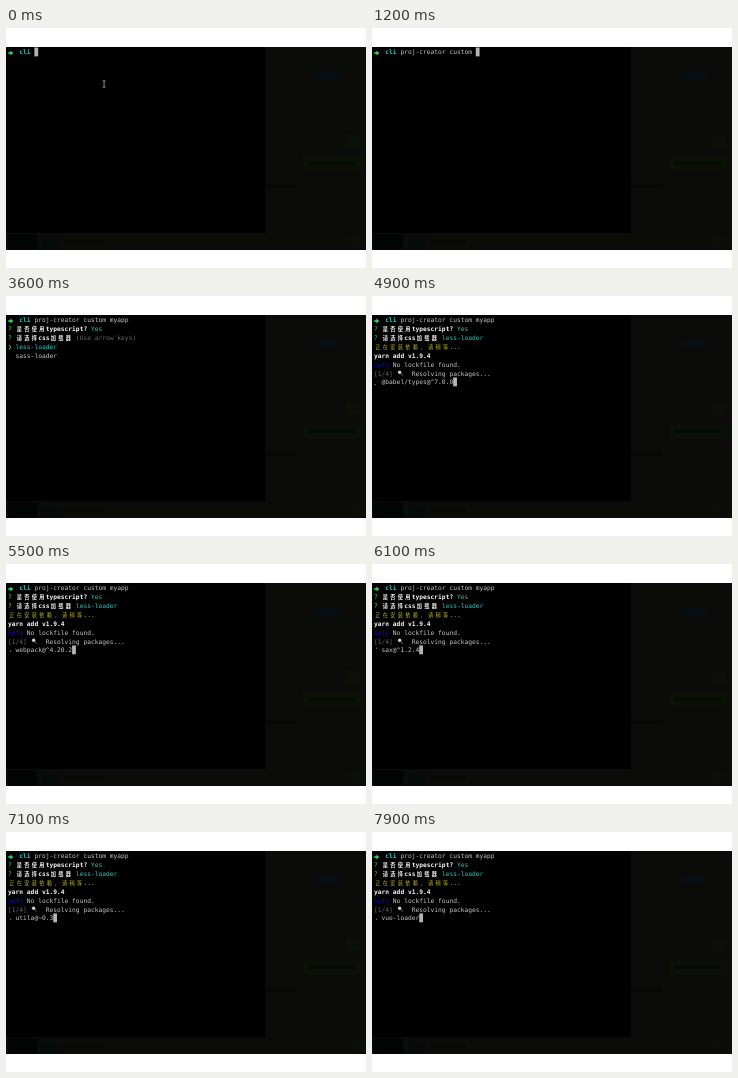
These frames come from a looping animation (360 by 240 pixels, 8000 ms). An HTML page with a canvas:

```html
<!DOCTYPE html>
<html lang="zh">
<head>
<meta charset="utf-8">
<title>Terminal</title>
<style>
  html, body { margin: 0; width: 100%; height: 100%; overflow: hidden; background: #fff; }
  canvas { display: block; width: 360px; height: 240px; }
</style>
</head>
<body>
<canvas id="stage"></canvas>
<script>
const LOOP = 8000;
const CELL = 3.77, ROW = 8.85, LEFT = 2, TOP = 19.5, SIZE = 6.25, WIDE_SIZE = 5.2;
const FONT = '"DejaVu Sans Mono", "Noto Sans CJK SC", "Noto Sans CJK", "DejaVu Sans", monospace';
const GREEN = '#2fe05a', CYAN = '#28c8ca', WHITE = '#f4f4f4', GREY = '#c4c4c4',
      DIM = '#686868', YELLOW = '#b9b524', BLUE = '#1212a4';

const PACKAGES = `@babel/core@^7.1.2 @babel/parser@^7.1.2 @babel/template@^7.1.2
@babel/types@^7.0.0 semver@^5.4.1 css-loader@^1.0.0 postcss-normalize-unicode@^4.0.1
loader-utils@^1.1.0 less-loader@^4.1.0 webpack@^4.20.2 acorn@^5.6.2 ajv@^6.1.0
micromatch@^3.1.8 tapable@^1.1.0 svgo@^1.0.0
sax@^1.2.4 mkdirp@~0.5.1 csso@^3.5.0 coa@~2.0.1 stable@~0.1.6 css-tree@1.0.0 mdn-data@~1.1.0
html-minifier@^3.2.3 pretty-error@^2.0.2 renderkid@^2.0.1
utila@~0.3 dom-converter@~0.2 htmlparser2@~3.3.0 domutils@1.1 domhandler@2.1
he@1.2.x vue@^2.5.17 vue-style-loader vue-loader`.split(/\s+/);
const FIRST_PACKAGE = 4600;

const canvas = document.getElementById('stage');
const ctx = canvas.getContext('2d');
const scale = window.devicePixelRatio || 1;
canvas.width = 360 * scale;
canvas.height = 240 * scale;

const isWide = ch => /[\u3000-\u9fff\uff00-\uffef]/.test(ch);

function rect(color, x, y, w, h) {
  ctx.fillStyle = color;
  ctx.fillRect(x, y, w, h);
}

// Writes [text, color, bold] segments on the cell grid and returns the next column.
function writeRow(row, segments, startCol = 0) {
  let col = startCol;
  const baseline = TOP + row * ROW + 6.9;
  for (const [text, color, bold] of segments) {
    ctx.fillStyle = color;
    for (const ch of text) {
      const wide = isWide(ch);
      ctx.font = `${bold ? 'bold ' : ''}${wide ? WIDE_SIZE : SIZE}px ${FONT}`;
      const inset = wide ? CELL - WIDE_SIZE / 2 : 0;
      ctx.fillText(ch, LEFT + col * CELL + inset, baseline - (wide ? 0.2 : 0));
      col += wide ? 2 : 1;
    }
  }
  return col;
}

function drawBackdrop() {
  rect('#fff', 0, 0, 360, 240);
  rect('#0b0c0a', 0, 19, 360, 203);
  rect('#070d12', 310, 44, 24, 7);
  rect('#0b1008', 341, 107, 13, 12);
  rect('#0b1107', 297, 129, 58, 13);
  rect('#070a06', 302, 133, 48, 4);
  rect('#070806', 259, 155, 31, 5);
  rect('#030404', 2, 206, 29, 16);
  rect('#060a0a', 37, 210, 17, 12);
  rect('#070808', 60, 212, 35, 4);
  rect('#0b0e08', 341, 208, 13, 12);
  rect('#000', 0, 19, 259, 186);
}

function drawPointer() {
  rect('#999', 96.5, 52.5, 3, 0.8);
  rect('#999', 97.6, 52.5, 0.9, 7);
  rect('#999', 96.5, 58.7, 3, 0.8);
}

function drawPromptArrow() {
  ctx.fillStyle = GREEN;
  ctx.fill(new Path2D('M2.2 24.2H4.4V22.4L7.2 25 4.4 27.6V25.8H2.2Z'));
}

function drawLens(row) {
  const x = LEFT + 6.8 * CELL, y = TOP + row * ROW + 3.7;
  ctx.strokeStyle = '#777';
  ctx.lineWidth = 1;
  ctx.beginPath();
  ctx.moveTo(x + 1, y + 1);
  ctx.lineTo(x + 3, y + 3.2);
  ctx.stroke();
  ctx.fillStyle = '#c8d0d4';
  ctx.beginPath();
  ctx.arc(x, y, 1.7, 0, 2 * Math.PI);
  ctx.fill();
}

// One dot circling a 2 by 4 grid.
function drawSpinner(row, tick) {
  const step = tick * 3 % 8, right = step > 3;
  rect('#aaa', LEFT + 0.6 + (right ? 1.5 : 0), TOP + row * ROW + 2.2 + 1.5 * (right ? 7 - step : step), 1, 1);
}

function typedCommand(t) {
  const tick = Math.floor(t / 100);
  if (t < 500) return ['', 'p', 'pro', 'proj-creator'][Math.min(tick, 3)];
  return 'proj-creator' + ' custom '.slice(0, tick - 4) + 'myapp'.slice(0, Math.max(0, tick - 13));
}

function drawInstall(t) {
  writeRow(3, [['正在安装依赖，请稍等...', YELLOW]]);
  if (t < 4300) return [4, 0];
  writeRow(4, [['yarn add v1.9.4', WHITE, true]]);
  if (t < 4400) return [5, 0];
  writeRow(5, [['info', BLUE], [' No lockfile found.', GREY]]);
  if (t < 4500) return [6, 0];
  writeRow(6, [['[1/4]', DIM], ['     Resolving packages...', GREY]]);
  drawLens(6);
  if (t < FIRST_PACKAGE) return [7, 0];
  const index = Math.floor((t - FIRST_PACKAGE) / 100);
  drawSpinner(7, Math.floor(t / 100));
  return [7, writeRow(7, [[PACKAGES[index], GREY]], 2)];
}

// Draws the session and returns the cursor as [row, column], or null when hidden.
function drawSession(t) {
  drawPromptArrow();
  const end = writeRow(0, [['cli ', CYAN, true], [typedCommand(t), GREY]], 3);
  if (t < 2000) return [0, end];
  if (t < 2400) return [1, 0];

  const ask = text => [['? ', GREEN], [text + ' ', WHITE, true]];
  const first = ask('是否使用typescript?');
  if (t < 3300) return [1, writeRow(1, [...first, [t < 3100 ? '(Y/n) ' : '(Y/n) y', GREY]])];
  writeRow(1, [...first, ['Yes', CYAN]]);

  const second = ask('请选择css加载器');
  if (t < 4000) {
    writeRow(2, [...second, ['(Use arrow keys)', DIM]]);
    writeRow(3, [['❯ less-loader', CYAN]]);
    writeRow(4, [['  sass-loader', GREY]]);
    return null;
  }
  writeRow(2, [...second, ['less-loader', CYAN]]);
  return drawInstall(t);
}

function draw(t) {
  ctx.setTransform(scale, 0, 0, scale, 0, 0);
  drawBackdrop();
  if (t < 500) drawPointer();
  const cursor = drawSession(t);
  if (cursor) rect('#b4b4b4', LEFT + cursor[1] * CELL, TOP + cursor[0] * ROW, CELL, ROW);
}

const start = performance.now();
function frame() {
  draw((performance.now() - start) % LOOP);
  requestAnimationFrame(frame);
}
frame();
</script>
</body>
</html>
```
